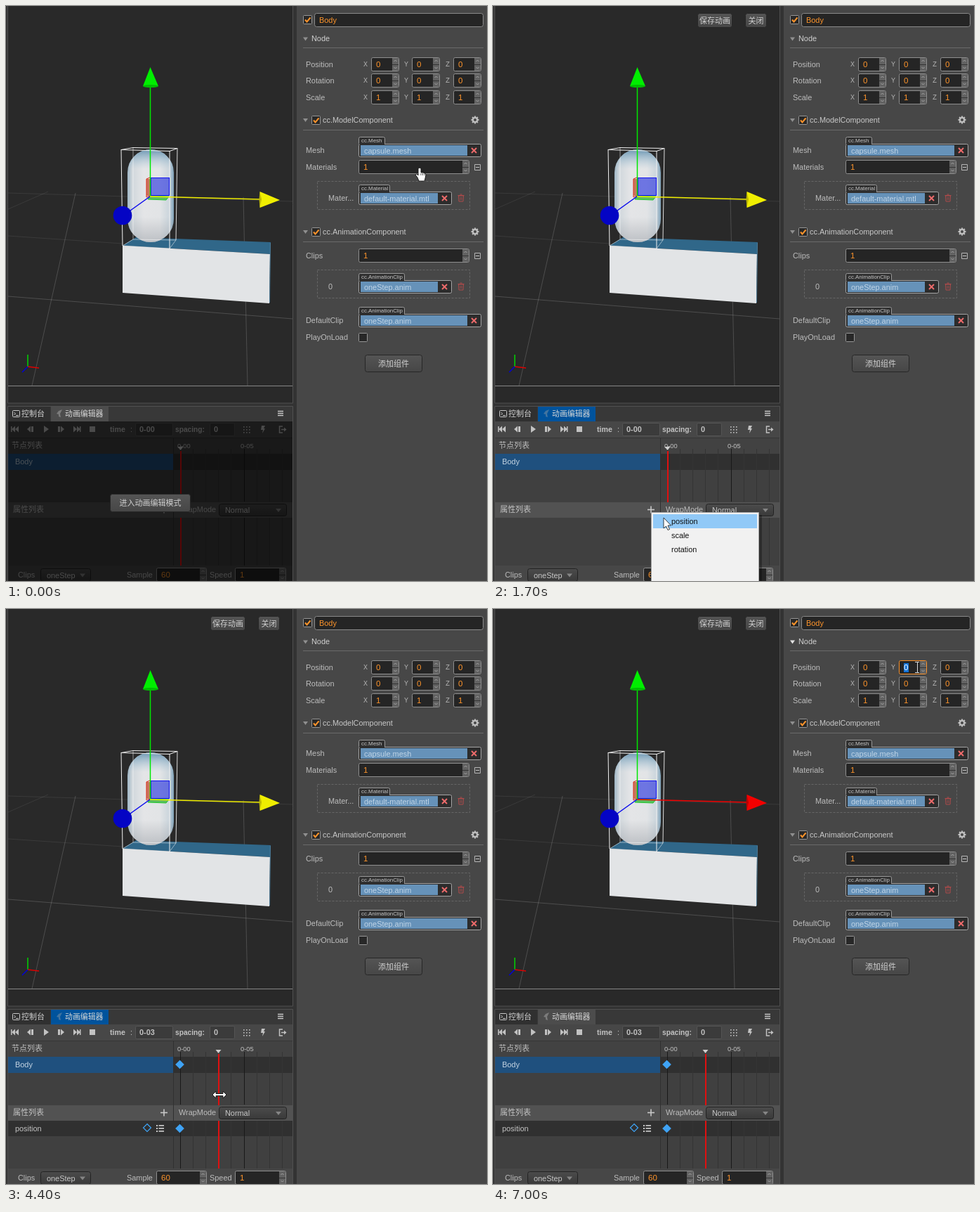
An HTML page with a canvas for the animation above (8000 ms loop, 685 by 818 pixels).

```html
<!DOCTYPE html>
<html>
<head>
<meta charset="utf-8">
<style>
html, body { margin: 0; width: 100%; height: 100%; overflow: hidden; background: #333; }
canvas { display: block; width: 685px; height: 818px; }
</style>
</head>
<body>
<canvas id="stage" width="685" height="818"></canvas>
<script>
const g = document.getElementById('stage').getContext('2d');
const SANS = '"Liberation Sans", "Noto Sans CJK SC", "Noto Sans CJK", sans-serif';
const INK = '#bdbdbd', ORANGE = '#fd942b', PANEL = '#474747', KEY = '#3fa3f5';
const LOOP = 8000, STEP = 100, CELL = 18.1, ZERO = 248;

function text(s, x, y, color = INK, size = 10.9, weight = '', font = SANS) {
  g.font = `${weight} ${size}px ${font}`;
  g.fillStyle = color;
  g.fillText(s, x, y);
}
function rect(x, y, w, h, color) {
  g.fillStyle = color;
  g.fillRect(x, y, w, h);
}
function box(x, y, w, h, fill, stroke, r = 2) {
  g.beginPath();
  g.roundRect(x + .5, y + .5, w - 1, h - 1, r);
  if (fill) { g.fillStyle = fill; g.fill(); }
  if (stroke) { g.strokeStyle = stroke; g.lineWidth = 1; g.stroke(); }
}
function line(pts, color, width = 1) {
  g.beginPath();
  for (let i = 0; i < pts.length; i += 2) g.lineTo(pts[i], pts[i + 1]);
  g.strokeStyle = color;
  g.lineWidth = width;
  g.stroke();
}
function poly(pts, fill, stroke, width = 1) {
  g.beginPath();
  for (let i = 0; i < pts.length; i += 2) g.lineTo(pts[i], pts[i + 1]);
  g.closePath();
  if (fill) { g.fillStyle = fill; g.fill(); }
  if (stroke) { g.strokeStyle = stroke; g.lineWidth = width; g.stroke(); }
}
function disc(x, y, r, color) {
  g.beginPath();
  g.arc(x, y, r, 0, 7);
  g.fillStyle = color;
  g.fill();
}
function vertical(y, h, a, b) {
  const grad = g.createLinearGradient(0, y, 0, y + h);
  grad.addColorStop(0, a);
  grad.addColorStop(1, b);
  return grad;
}
function button(s, x, y, w, h, lit) {
  box(x, y, w, h, lit ? vertical(y, h, '#6a6a6a', '#5a5a5a') : vertical(y, h, '#555', '#464646'), '#262626', 3);
  g.textAlign = 'center';
  text(s, x + w / 2, y + h / 2 + 4, '#d0d0d0', 11);
  g.textAlign = 'left';
}
const down = (x, y, color, r = 3.5) => poly([x - r, y - 2, x + r, y - 2, x, y + 3], color);

// Inspector
function checkbox(x, y, on) {
  box(x, y, 13, 13, '#282828', '#969696', 1);
  if (on) line([x + 3, y + 6.5, x + 5.5, y + 9.5, x + 10.5, y + 3.5], ORANGE, 2);
}
function spinner(x, y, h) {
  const mid = y + Math.floor(h / 2);
  rect(x, y + 1, 9, h - 2, '#626262');
  rect(x, mid, 9, 1, '#333');
  line([x + 2.5, mid - 4, x + 4.5, mid - 6, x + 6.5, mid - 4], '#a5a5a5');
  line([x + 2.5, mid + 4, x + 4.5, mid + 6, x + 6.5, mid + 4], '#a5a5a5');
}
function number(v, x, y, w, h = 19, edge = '#8f8f8f') {
  box(x, y, w, h, '#252525', edge);
  spinner(x + w - 10, y, h);
  text(v, x + 7, y + h / 2 + 4, ORANGE, 11.5);
}
function asset(tag, name, x, y, w, tagW) {
  box(x, y - 10, tagW, 12, '#303030', '#999');
  box(x, y, w, 19, '#2c2c2c', '#a5a5a5');
  rect(x + 1, y - 1, tagW - 2, 2, '#2f2f2f');
  text(tag, x + 4, y - 2, '#c6c6c6', 7.9);
  rect(x + 3, y + 2, w - 23, 15, '#6692b9');
  text(name, x + 8, y + 13.5, '#c0d4e6');
  const cx = x + w - 10.5, cy = y + 9.5;
  line([cx - 3.5, cy - 3.5, cx + 3.5, cy + 3.5], '#ee6b6b', 2);
  line([cx + 3.5, cy - 3.5, cx - 3.5, cy + 3.5], '#ee6b6b', 2);
}
function trash(x, y) {
  line([x - 4.5, y - 3.5, x + 4.5, y - 3.5], '#ad4a4a');
  line([x - 1.5, y - 5, x + 1.5, y - 5], '#ad4a4a');
  poly([x - 3.5, y - 3, x + 3.5, y - 3, x + 3, y + 5, x - 3, y + 5], null, '#ad4a4a');
  for (const d of [-1, 1]) line([x + d, y - 1, x + d, y + 3], '#ad4a4a', .8);
}
function gear(x, y) {
  for (let i = 0; i < 4; i++) {
    const c = Math.cos(i * Math.PI / 4) * 5.5, s = Math.sin(i * Math.PI / 4) * 5.5;
    line([x - c, y - s, x + c, y + s], '#c0c0c0', 2.2);
  }
  disc(x, y, 4, '#c0c0c0');
  disc(x, y, 2, PANEL);
}
function component(name, y) {
  down(426.5, y, '#8f8f8f');
  checkbox(435, y - 6, true);
  text(name, 451, y + 4, '#c8c8c8');
  gear(668, y);
  line([423, y + 14.5, 680, y + 14.5], '#6a6a6a');
}
function list(label, y) {
  text(label, 427, y + 4);
  number('1', 502, y - 10, 158, 20);
  box(667, y - 4, 9, 9, null, '#b5b5b5', 0);
  line([669, y + .5, 674, y + .5], '#c5c5c5');
  g.setLineDash([3, 2]);
  box(443, y + 20, 218, 41, null, '#666', 0);
  g.setLineDash([]);
  trash(648, y + 44);
}
function inspector(s) {
  rect(414, 0, 271, 818, PANEL);
  checkbox(423, 13, true);
  box(439, 10, 241, 20, '#252525', '#8a8a8a', 3);
  text('Body', 446, 24, ORANGE);
  down(426.5, 46.5, s.nodeHover ? '#e2e2e2' : '#909090');
  text('Node', 435, 50, '#d0d0d0');
  line([423, 59.5, 680, 59.5], '#6a6a6a');
  ['Position', 'Rotation', 'Scale'].forEach((name, row) => {
    const y = 83 + row * 23.5 | 0;
    text(name, 427, y + 4);
    ['X', 'Y', 'Z'].forEach((axis, col) => {
      const x = 520 + col * 58.5 | 0, hot = !row && col === 1 && s.t >= 6700;
      text(axis, x - 11, y + 3, '#b0b0b0', 10, '', '"Liberation Mono", monospace');
      number(row === 2 ? '1' : '0', x, y - 10, 40, 20, hot ? ORANGE : undefined);
      if (hot && s.t >= 6900) {
        rect(x + 7, y - 6, 7, 13, '#1673d6');
        text('0', x + 7, y + 4, '#fff', 11.5);
      }
    });
  });
  component('cc.ModelComponent', 162);
  text('Mesh', 427, 209);
  asset('cc.Mesh', 'capsule.mesh', 502, 196, 175, 38);
  list('Materials', 229);
  text('Mater...', 459, 277);
  asset('cc.Material', 'default-material.mtl', 502, 264, 133, 45);
  component('cc.AnimationComponent', 321);
  list('Clips', 355);
  text('0', 459, 403);
  asset('cc.AnimationClip', 'oneStep.anim', 502, 390, 133, 66);
  text('DefaultClip', 427, 451);
  asset('cc.AnimationClip', 'oneStep.anim', 502, 438, 175, 66);
  text('PlayOnLoad', 427, 475);
  checkbox(502, 465, false);
  button('添加组件', 511, 496, 82, 25);
}

// Scene view
function scene(s) {
  rect(3, 0, 405, 565, '#292929');
  const faint = 'rgba(255,255,255,.08)', soft = 'rgba(255,255,255,.17)';
  line([3, 266, 408, 278], faint);
  line([3, 327, 166, 338], faint);
  line([3, 413, 408, 445], soft);
  line([99, 266, 37, 540], soft);
  line([338, 272, 344, 540], soft);
  line([3, 289, 60, 264], faint);
  line([3, 540.5, 408, 540.5], '#858585');

  poly([166, 341, 185, 329, 377, 336, 376, 353], '#306789');
  poly([166, 341, 376, 353, 375, 423, 166, 408], '#e2e4e6');
  line([376.5, 337, 375.5, 422], '#4c7b98');

  const body = g.createLinearGradient(173, 0, 239, 0);
  [[0, '#9fb6c5'], [.1, '#d0d7dc'], [.35, '#e4e5e7'], [.7, '#e2e4e6'], [.9, '#cbd5dc'], [1, '#7ea2b9']]
    .forEach(([at, c]) => body.addColorStop(at, c));
  g.beginPath();
  g.roundRect(173, 204, 66, 132, 33);
  g.fillStyle = body;
  g.fill();
  g.fillStyle = vertical(204, 28, 'rgba(85,135,168,.85)', 'rgba(160,195,215,0)');
  g.fill();
  g.fillStyle = vertical(300, 36, 'rgba(150,155,162,0)', 'rgba(150,155,162,.5)');
  g.fill();

  poly([164, 204.5, 181, 201.5, 244, 202.5, 233, 206.5], null, '#ededed');
  poly([166, 341, 181, 332, 242, 333, 233, 345], null, 'rgba(255,255,255,.5)');
  line([164, 204, 166, 341], '#f2f2f2');
  line([233, 206, 233, 345], '#f2f2f2');
  line([244, 202, 242, 333], '#ddd');
  line([181, 201, 181, 332], 'rgba(255,255,255,.5)');

  rect(200, 246, 6, 24, 'rgba(190,70,35,.7)');
  line([205, 244, 200, 246, 200, 272, 205, 270], '#dd2818');
  poly([205, 270, 232, 271, 228, 276, 202, 275], 'rgba(60,180,60,.8)', '#20c830');
  rect(206, 244, 27, 25, 'rgba(55,65,225,.68)');
  g.strokeStyle = '#1212f0';
  g.strokeRect(206.5, 244.5, 26, 25);

  line([205.5, 271, 205.5, 114], '#00e800', 1.5);
  poly([205.5, 87, 217, 114, 195, 114], '#00ee00');
  g.beginPath();
  g.ellipse(206, 114, 11, 2, 0, 0, 7);
  g.fillStyle = '#00bc00';
  g.fill();
  const side = s.axisHot ? ['#f0ee00', '#bdb800'] : ['#f30000', '#bb0000'];
  line([205, 271, 362, 275], side[0], 1.5);
  poly([390, 276, 361.5, 264, 361.5, 287], side[0]);
  poly([361.5, 264, 364, 275, 361.5, 287, 360.5, 275], side[1]);
  line([205, 271, 170, 296], '#0808ee', 1.5);
  disc(166, 298, 13.3, '#0404c4');

  line([31, 513, 31, 496], '#00d600', 1.5);
  line([31, 513, 47, 515], '#e00000', 1.5);
  line([31, 513, 23, 521], '#0000dd', 1.5);
  if (s.editing) {
    button('保存动画', 291, 10, 50, 21);
    button('关闭', 359, 10, 31, 21);
  }
}

// Timeline panel
function diamond(x, y, filled) {
  poly([x, y - 5.5, x + 5.5, y, x, y + 5.5, x - 5.5, y], filled ? KEY : null, KEY, 1.2);
}
function select(s, x, y, w, h) {
  box(x, y, w, h, vertical(y, h, '#4c4c4c', '#393939'), '#222', 3);
  text(s, x + 9, y + h / 2 + 4, '#c8c8c8');
  down(x + w - 12, y + h / 2, '#858585', 4);
}
function tabs(s) {
  rect(3, 570, 405, 21, '#383838');
  rect(3, 570, 60, 21, '#303030');
  rect(64, 570, 82, 21, s.focus ? '#00539c' : '#4c4c4c');
  box(9, 575, 11, 10, null, '#c8c8c8', 1);
  line([11.5, 578, 13.5, 580, 11.5, 582], '#ccc');
  line([14, 582.5, 18, 582.5], '#ccc');
  text('控制台', 22, 584, '#d0d0d0', 11);
  poly([80, 574, 77, 580, 78, 585, 75, 584, 75, 581, 72, 580, 75, 576], s.focus ? '#4274a0' : '#7b7b7b');
  text('动画编辑器', 84, 584, '#d8d8d8', 10.9);
  for (const y of [576.5, 579.5, 582.5]) line([387, y, 395, y], '#c5c5c5', 1.5);
}
function toolbar(s) {
  const c = '#c2c2c2', y = 602;
  const tri = (x, d) => poly([x, y - 4.5, x, y + 4.5, x + 5 * d, y], c);
  rect(7, y - 4, 1.5, 8, c); tri(13, -1); tri(18, -1);
  tri(35, -1); rect(36, y - 4, 3, 8, c);
  poly([54, y - 5, 54, y + 5, 61, y], c);
  rect(74, y - 4, 3, 8, c); tri(78, 1);
  tri(96, 1); tri(101, 1); rect(105, y - 4, 1.5, 8, c);
  rect(119, y - 4, 8, 8, c);
  text('time', 148, 606, c, 10.6, 'bold');
  text(':', 177, 606, c);
  box(184, 593, 54, 19, '#3b3b3b', '#555');
  text('0-0' + s.frame, 190, 606, c, 10.9, 'bold');
  text('spacing:', 241, 606, c, 10.2, 'bold');
  box(290, 593, 36, 19, '#3b3b3b', '#555');
  text('0', 296, 606, c, 10.9, 'bold');
  for (let i = 0; i < 9; i++) rect(338 + i % 3 * 4, 598 + (i / 3 | 0) * 4, 1.6, 1.6, c);
  poly([364, 597, 369, 597, 367, 601, 369, 601, 365, 608, 366, 603, 363, 603], c);
  line([394, 598, 389.5, 598, 389.5, 607, 394, 607], c, 1.5);
  line([392, 602.5, 398, 602.5], c, 1.5);
  poly([396, 599.5, 399.5, 602.5, 396, 605.5], c);
}
function gridLines(y, h) {
  for (let i = 0; i < 9; i++) {
    const x = Math.round(ZERO + i * CELL) + .5;
    line([x, y, x, y + h], i % 5 ? '#343434' : '#191919');
  }
}
function timeline(s) {
  rect(3, 591, 405, 227, '#404040');
  rect(3, 591, 405, 23, PANEL);
  toolbar(s);
  rect(3, 614, 405, 23, '#424242');
  line([3, 614.5, 408, 614.5], '#363636');
  text('节点列表', 8, 629, INK, 11);
  rect(239, 637, 169, 23, '#303030');
  rect(3, 706, 405, 22, '#525252');
  if (s.hasRow) {
    rect(3, 728, 405, 22, '#303030');
    if (s.rowHover) rect(3, 728, 235, 22, '#6c6a69');
  }
  gridLines(630, 75);
  gridLines(728, 68);
  rect(3, 637, 235, 23, '#1f507e');
  text('Body', 13, 652, '#c4d4e2');
  line([238.5, 614, 238.5, 796], '#303030');
  text('0-00', 244, 629, '#c4c4c4', 9.3);
  text('0-05', 334, 629, '#c4c4c4', 9.3);
  text('属性列表', 10, 720, '#c4c4c4', 11);
  line([220, 716.5, 230, 716.5], '#c8c8c8', 1.6);
  line([225, 711.5, 225, 721.5], '#c8c8c8', 1.6);
  if (s.hover) {
    const x = Math.round(ZERO + s.hoverCell * CELL), y = Math.min(760, s.y + 33);
    rect(x, 632, 1, 74, '#7a1919');
    rect(x, 728, 1, 68, '#7a1919');
    box(x - 9, y, 13, 15, 'rgba(72,72,72,.8)', '#505050');
    text(s.hoverCell, x - 5.5, y + 11.5, '#777', 10.5);
  }
  if (s.keyed) diamond(247.5, 648, true);
  if (s.hasRow) {
    text('position', 13, 743, s.rowHover ? '#fff' : '#c4c4c4', s.rowHover ? 10.5 : 10.9, s.rowHover ? 'bold' : '');
    diamond(201, 738, s.keyed && s.frame === 0);
    for (const y of [735, 739, 743]) {
      rect(214, y - 1, 2, 2, s.rowHover ? '#fff' : '#c8c8c8');
      rect(217.5, y - 1, 7.5, 1.7, s.rowHover ? '#fff' : '#c8c8c8');
    }
    if (s.keyed) diamond(247.5, 739, true);
  }
  const px = Math.round(ZERO + s.frame * CELL);
  down(px + .5, 629, '#cfcfcf', 4);
  rect(px, 633, 2, 73, '#e01010');
  rect(px, 728, 2, 68, '#e01010');
  text('WrapMode', 246, 720);
  select('Normal', 303, 708, 97, 18);
  rect(3, 796, 405, 22, PANEL);
  text('Clips', 17, 813);
  select('oneStep', 49, 800, 72, 19);
  text('Sample', 172, 813);
  number('60', 214, 799, 72, 20);
  text('Speed', 290, 813);
  number('1', 326, 799, 73, 20);
  if (!s.editing) {
    rect(3, 591, 405, 227, 'rgba(0,0,0,.62)');
    const over = s.x > 148 && s.x < 263 && s.y > 694 && s.y < 720;
    button('进入动画编辑模式', 148, 694, 115, 26, over);
  }
}
function menu(s) {
  const x = 225, y = 720, row = 20;
  rect(x + 4, y + 4, 154, 98, 'rgba(0,0,0,.3)');
  box(x, y, 154, 110, '#f1f1f1', '#a5a5a5', 0);
  ['position', 'scale', 'rotation'].forEach((name, i) => {
    const top = y + 3 + i * row;
    if (s.x > x && s.y >= top && s.y < top + row) rect(x + 3, top, 148, row, '#91c9f7');
    text(name, x + 29, top + 14, '#111');
  });
}

// Pointer: time, x, y of the hot spot
const PATH = [
  [0, 589, 230], [400, 245, 797], [600, 203, 709], [1000, 203, 709], [1300, 225, 720],
  [1400, 225, 720], [1900, 253, 734], [2400, 238, 737], [2700, 202, 739], [2800, 202, 739],
  [3100, 226, 716], [3600, 249, 691], [3700, 249, 691], [4400, 304, 691], [4900, 304, 691],
  [5500, 202, 740], [5600, 202, 740], [5800, 206, 745], [6300, 660, 160], [6500, 604, 126],
  [6700, 604, 83], [8000, 604, 83]
];
// Slope at a point; zero where the pointer rests
function slope(i, axis) {
  const a = PATH[i - 1], b = PATH[i], c = PATH[i + 1];
  if (!a || !c || (b[axis] - a[axis]) * (c[axis] - b[axis]) <= 0) return 0;
  return (c[axis] - a[axis]) / (c[0] - a[0]);
}
function pointerAt(t) {
  const i = Math.max(1, PATH.findIndex(p => p[0] >= t));
  const a = PATH[i - 1], b = PATH[i], d = b[0] - a[0], k = (t - a[0]) / d;
  const ease = k * k * (3 - 2 * k);
  return [1, 2].map(axis => Math.round(
    a[axis] + (b[axis] - a[axis]) * ease
    + d * k * (1 - k) * ((1 - k) * slope(i - 1, axis) - k * slope(i, axis))
  ));
}
function pointerKind(s) {
  if (s.t >= 6500) return 'beam';
  if (s.t >= 3500 && s.t < 5000) return 'resize';
  const overPlus = s.editing && Math.abs(s.x - 225) < 8 && Math.abs(s.y - 716) < 8;
  return s.t < 100 || s.t >= 600 && s.t < 800 || overPlus && !s.menu ? 'hand' : 'arrow';
}
function pointer(s) {
  g.save();
  g.translate(s.x, s.y);
  switch (pointerKind(s)) {
    case 'arrow':
      poly([0, 0, 0, 15, 3.5, 12, 6, 17.5, 8.5, 16.5, 6, 11, 10.5, 11], '#fff', '#111', .8);
      break;
    case 'hand':
      poly([-2, 1, 0, 0, 2, 1, 2, 7, 5, 7, 8, 8, 9, 10, 8, 15, 7, 19, -1, 19, -3, 14, -6, 10, -4, 9, -2, 11], '#fff', '#111', .9);
      for (const x of [2, 4.5, 7]) line([x, 8, x, 11], '#333', .8);
      break;
    case 'resize':
      poly([-10, 0, -5, -5, -5, -1.5, 5, -1.5, 5, -5, 10, 0, 5, 5, 5, 1.5, -5, 1.5, -5, 5], '#fff', '#111', .9);
      break;
    case 'beam':
      line([-3, -7.5, 3, -7.5], '#ddd');
      line([.5, -7, .5, 7], '#ddd');
      line([-3, 7.5, 3, 7.5], '#ddd');
  }
  g.restore();
}

function stateAt(t) {
  const [x, y] = pointerAt(t), cell = Math.max(0, Math.round((x - 250) / CELL));
  const tracked = t >= 2000 && t < 3800 || t >= 5000 && t < 6500;
  return {
    t, x, y,
    editing: t >= 800,
    focus: t >= 800 && t < 6900,
    menu: t >= 1400 && t < 2000,
    hasRow: t >= 2000,
    keyed: t >= 2900,
    frame: t < 3800 ? 0 : t < 4400 ? Math.min(3, cell) : 3,
    rowHover: t >= 2000 && y >= 728 && y <= 750 && x < 238,
    hover: tracked && y > 614 && x < 408,
    hoverCell: cell,
    axisHot: t < 6100,
    nodeHover: t >= 6400
  };
}
function draw(now) {
  const s = stateAt(Math.floor(now % LOOP / STEP) * STEP);
  rect(0, 0, 685, 818, '#333');
  scene(s);
  tabs(s);
  timeline(s);
  line([2.5, 0, 2.5, 565, 408.5, 565, 408.5, 0], '#505050');
  line([2.5, 818, 2.5, 569.5, 408.5, 569.5, 408.5, 818], '#505050');
  inspector(s);
  if (s.menu) menu(s);
  pointer(s);
}
const start = performance.now();
function tick() {
  draw(performance.now() - start);
  requestAnimationFrame(tick);
}
tick();
</script>
</body>
</html>
```
